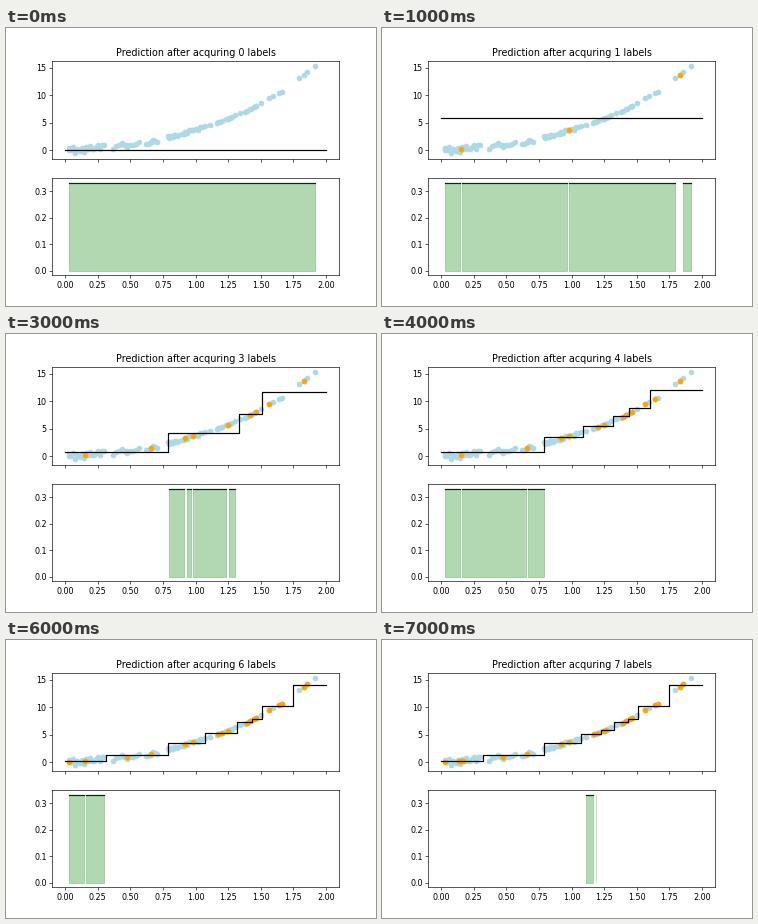
These frames come from a looping animation (370x278 px, 8000 ms). A matplotlib script:

```python
import numpy as np
import matplotlib.pyplot as plt
from matplotlib.animation import FuncAnimation

DPI = 57.8125
STEPS = 8
BATCH = 3
TOP = 0.332  # height of the acquisition score

rng = np.random.default_rng(4)


def trend(x):
    return np.interp(x, [0, 0.15, 0.655, 0.95, 1.22, 1.41, 1.565, 1.66, 1.835, 1.92],
                     [0.1, 0.3, 1.47, 3.5, 5.5, 7.35, 9.6, 10.7, 13.8, 15.4])


# Queried x in order, three per step, and the first query still to come
queries = np.array([
    0.15, 0.98, 1.835, 0.655, 0.92, 1.245, 1.42, 1.46, 1.565, 1.2, 1.395,
    1.64, 0.475, 1.445, 1.858, 0.029, 1.17, 1.66, 0.135, 0.165, 1.26, 1.14,
])

# The rest of the pool clusters in runs: start, end, count
runs = [
    (0.03, 0.3, 18), (0.365, 0.565, 10), (0.62, 0.705, 7), (0.785, 0.865, 9),
    (0.895, 1.07, 11), (1.11, 1.165, 2), (1.187, 1.235, 2), (1.257, 1.305, 3),
    (1.34, 1.505, 5), (1.595, 1.595, 1), (1.795, 1.918, 2),
]

label_x = queries[:-1]
label_y = trend(label_x)
rest_x = np.concatenate([np.linspace(*run) for run in runs])
noise = np.interp(rest_x, [0.3, 1.3], [0.75, 0.1])
rest_y = trend(rest_x) + noise * rng.uniform(-1, 0.6, rest_x.size)

all_x = np.concatenate([label_x, rest_x])
all_y = np.concatenate([label_y, rest_y])
order = np.argsort(all_x, kind="stable")

fig, (top, bottom) = plt.subplots(2, sharex=True, dpi=DPI,
                                  figsize=(6.4, 4.80866))


def grow(x, y):
    """Leaves of a regression tree with at least two points in each."""
    if len(y) < 4 or np.ptp(y) < 0.25:
        return [(x, y)]
    cuts = range(2, len(y) - 1)
    cut = min(cuts, key=lambda c: y[:c].var() * c + y[c:].var() * (len(y) - c))
    return grow(x[:cut], y[:cut]) + grow(x[cut:], y[cut:])


def fit(step):
    """Edges and levels of the piecewise constant prediction."""
    if step == 0:
        return np.array([0, 2]), np.array([0])
    known = np.argsort(label_x[:BATCH * step])
    leaves = grow(label_x[known], label_y[known])
    borders = [(a[0][-1] + b[0][0]) / 2 for a, b in zip(leaves, leaves[1:])]
    return np.array([0, *borders, 2]), np.array([y.mean() for _, y in leaves])


def draw_prediction(step, edges, levels):
    known = slice(BATCH * step)
    top.scatter(all_x, all_y, color="lightblue")
    top.scatter(label_x[known], label_y[known], color="orange")
    top.plot(np.repeat(edges, 2)[1:-1], np.repeat(levels, 2), color="black")
    top.set_title(f"Prediction after acquring {step} labels", pad=6.3)
    top.set_ylim(-1.5, 16.19)
    top.set_yticks([0, 5, 10, 15])
    top.tick_params(labelbottom=False)


def draw_score(step, edges):
    """Score the unlabelled points in the leaf that is queried next."""
    x = all_x[order]
    leaf = np.searchsorted(edges, queries[BATCH * step])
    scored = (order >= BATCH * step) & (x > edges[leaf - 1]) & (x < edges[leaf])
    bottom.plot(x, np.where(scored, TOP, np.nan), color="black")
    bottom.fill_between(x, 0, TOP, where=scored, color="green", alpha=0.3,
                        zorder=3)
    bottom.set_ylim(-0.05 * TOP, 1.05 * TOP)
    bottom.set_yticks([0, 0.1, 0.2, 0.3])
    bottom.set_xticks(np.arange(0, 2.1, 0.25))
    bottom.set_xlim(-0.1, 2.1)


def update(step):
    top.cla()
    bottom.cla()
    edges, levels = fit(step)
    draw_prediction(step, edges, levels)
    draw_score(step, edges)


anim = FuncAnimation(fig, update, frames=STEPS, interval=1000,
                     repeat=True, repeat_delay=0, blit=False)
plt.show()
```
